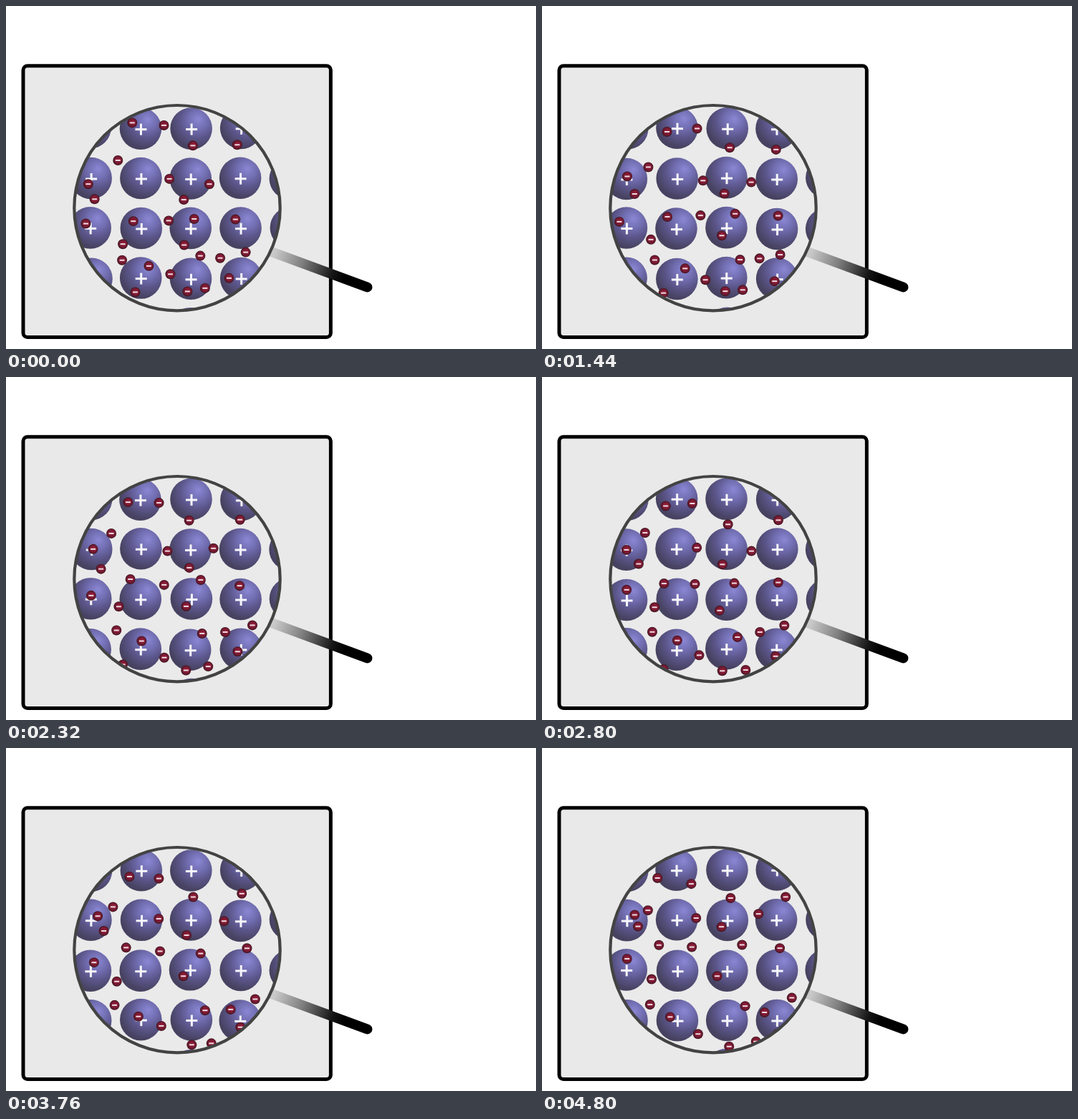
These frames come from a looping animation (740 px wide and 480 px high, 4880 ms). An HTML page with a canvas:

```html
<!DOCTYPE html>
<html lang="en">
<head>
<meta charset="utf-8">
<title>Electrons among metal ions</title>
<style>
  html, body { margin: 0; width: 100%; height: 100%; overflow: hidden; background: #fff; }
  canvas { display: block; }
</style>
</head>
<body>
<canvas id="stage" width="740" height="480"></canvas>
<script>
const ctx = document.getElementById('stage').getContext('2d');
const STEP = 80, STEPS = 61;
const LENS = { x: 239, y: 282.7, r: 143.7 };
const TAU = Math.PI * 2;

// Electrons roam around these homes: height, then the places along it
const homes = {
  176: [174, 214], 202: [260, 328], 222: [149], 241: [120, 220, 295],
  263: [130, 252], 288: [175, 216, 270, 329], 300: [115], 325: [154, 249],
  348: [340], 360: [155, 275, 306], 368: [192], 389: [225, 325], 405: [168, 256, 285]
};
const electrons = Object.entries(homes).flatMap(([y, xs]) => xs.map(x => ({ x, y: +y })));

// Repeatable noise in -1..1
function noise(a, b) {
  const v = Math.sin(a * 127.1 + b * 311.7) * 43758.5453;
  return (v - Math.floor(v)) * 2 - 1;
}

// Noise eased between whole values of t
function smoothNoise(seed, t) {
  const i = Math.floor(t), k = t - i, ease = k * k * (3 - 2 * k);
  return noise(seed, i) * (1 - ease) + noise(seed, i + 1) * ease;
}

function disc(x, y, r, fill) {
  ctx.beginPath();
  ctx.arc(x, y, r, 0, TAU);
  ctx.fillStyle = fill;
  ctx.fill();
}

function gradient(g, ...stops) {
  for (const [at, color] of stops) g.addColorStop(at, color);
  return g;
}

const handle = gradient(ctx.createLinearGradient(375, 345, 505, 394),
  [0, '#c9c9c9'], [.3, '#7e7e7e'], [.62, '#161616'], [.75, '#000']);
const ionFill = gradient(ctx.createRadialGradient(10, -13, 1, 8, -10, 40),
  [0, '#8985d1'], [.3, '#736fb3'], [.6, '#5b568a'], [.95, '#474260']);
const electronFill = gradient(ctx.createRadialGradient(1, -1, 1, 0, 0, 7),
  [0, '#931d3a'], [.65, '#751a31'], [1, '#3c151f']);

function ion(x, y) {
  ctx.save();
  ctx.translate(x, y);
  disc(0, 0, 29.3, ionFill);
  ctx.fillStyle = '#f6f6fb';
  ctx.fillRect(-7.5, -.5, 16, 3);
  ctx.fillRect(-1, -7, 3, 16);
  ctx.restore();
}

function electron(x, y) {
  ctx.save();
  ctx.translate(x, y);
  disc(0, 0, 7, electronFill);
  ctx.fillStyle = '#eedde2';
  ctx.fillRect(-3.5, -1, 7, 2);
  ctx.restore();
}

// A slow swirl carries each electron past its home while it is jostled at random
function roam({ x, y }, i, progress) {
  const drift = progress - .5, beat = progress * 8;
  return [
    x + 20 * Math.sin((x - 250) / 35) * drift + 6 * smoothNoise(i, beat),
    y + 18 * Math.cos((y - 170) / 36) * drift + 6 * smoothNoise(i + 50, beat)
  ];
}

function drawSetting() {
  ctx.fillStyle = '#fff';
  ctx.fillRect(0, 0, 740, 480);

  ctx.beginPath();
  ctx.roundRect(24, 83.7, 429.4, 379.7, 6);
  ctx.fillStyle = '#e9e9e9';
  ctx.fill();
  ctx.lineWidth = 5;
  ctx.strokeStyle = '#000';
  ctx.stroke();

  ctx.beginPath();
  ctx.moveTo(372, 344.5);
  ctx.lineTo(504.5, 393.5);
  ctx.lineWidth = 14;
  ctx.lineCap = 'round';
  ctx.strokeStyle = handle;
  ctx.stroke();
}

function draw(now) {
  const step = Math.floor(now / STEP) % STEPS;
  const progress = step / (STEPS - 1);
  drawSetting();

  ctx.save();
  disc(LENS.x, LENS.y, LENS.r, '#eaeaea');
  ctx.clip();
  for (let row = 0; row < 5; row++)
    for (let col = 0; col < 5; col++) {
      const id = row * 5 + col;
      ion(118.6 + col * 69.7 + noise(id, step), 171 + row * 70 + noise(id + 40, step));
    }
  electrons.forEach((home, i) => electron(...roam(home, i, progress)));
  ctx.restore();

  ctx.beginPath();
  ctx.arc(LENS.x, LENS.y, LENS.r, 0, TAU);
  ctx.lineWidth = 4.2;
  ctx.strokeStyle = '#434343';
  ctx.stroke();
}

function frame() {
  draw(performance.now());
  requestAnimationFrame(frame);
}
frame();
</script>
</body>
</html>
```
